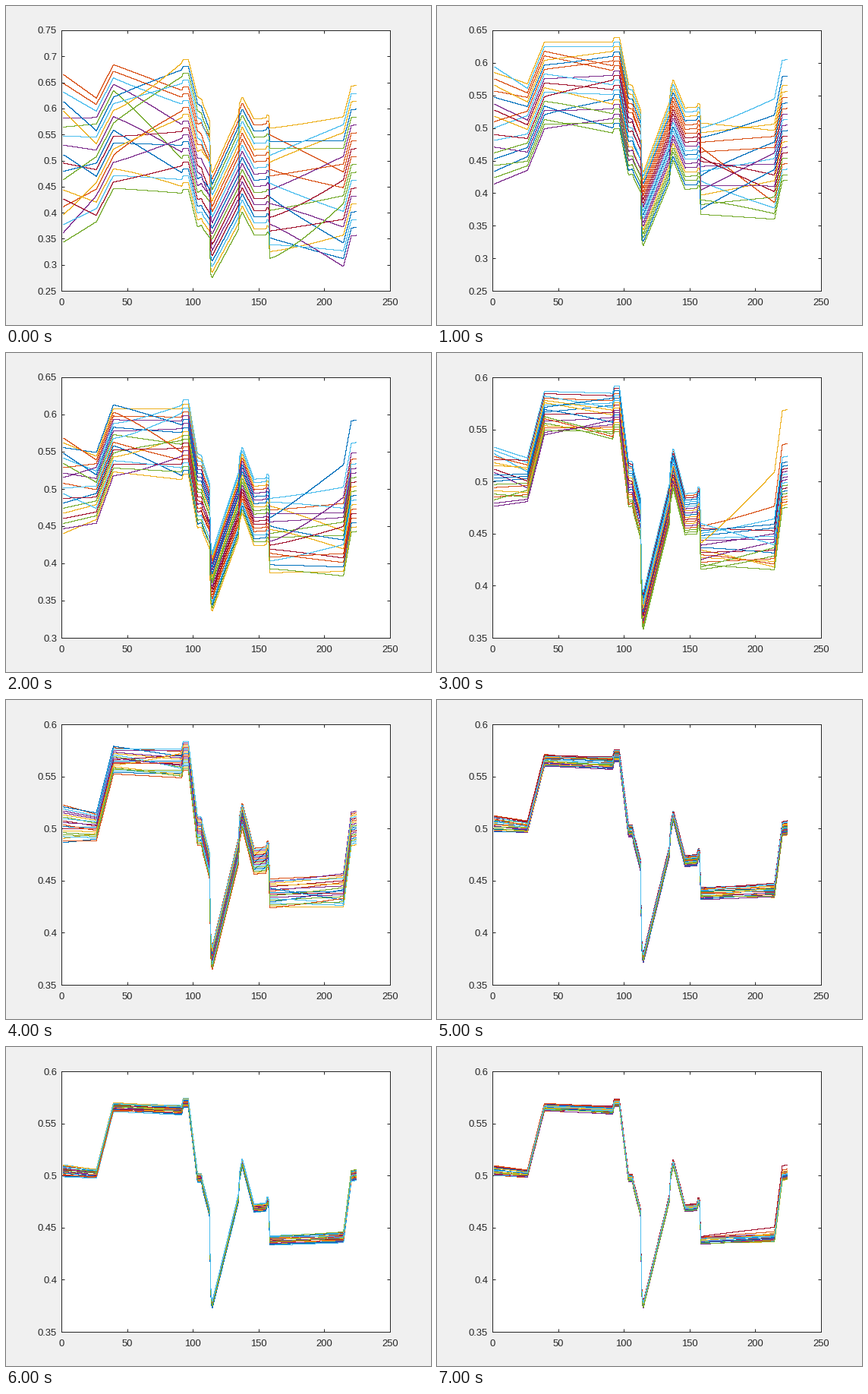
Animation, 560 px wide and 420 px high, one loop 8 s. Source, as a matplotlib script:

```python
import numpy as np
import matplotlib.pyplot as plt
from matplotlib.animation import FuncAnimation

plt.rcParams["font.family"] = "Liberation Sans"
W, H, DPI = 560, 420, 100
PX = 72 / DPI
INK = "#262626"
COLORS = ["#0072BD", "#D95319", "#EDB120", "#7E2F8E",
          "#77AC30", "#4DBEEE", "#A2142F"]
COUNT = 20
LEFT, BOTTOM, AX_W, AX_H = 73, 45, 433, 343
X_MAX = 250

# Curve that all others settle on
KNOTS = np.array([
    (0, .505), (26, .502), (39, .566), (91, .563), (92, .570), (96, .570),
    (103, .498), (106, .498), (107, .490), (112, .466), (113, .390),
    (114, .375), (134, .478), (135, .500), (137, .513), (146, .469),
    (155, .470), (156, .476), (157, .475), (158, .438), (214, .441),
    (220, .500), (224, .501)])
X = np.arange(2, 389) * X_MAX / AX_W    # one sample per pixel column
BASE = np.interp(X, *KNOTS.T)

# Relative spread at x = 0, 39, 91, 158, 214 and how far curves swap rank there
SPREAD = [1.3, 0.95, 1, 1, 1.15]
SWAP = [0.5, 0.12, 0.25, 0.08, 0.25]

# Per step: axis limits, spread, stretch of the topmost curve's right end
STEPS = [(0.25, 0.75, 0.125, 0), (0.25, 0.65, 0.070, 0.3),
         (0.30, 0.65, 0.050, 0.6), (0.35, 0.60, 0.022, 1.7),
         (0.35, 0.60, 0.014, 0), (0.35, 0.60, 0.006, 0),
         (0.35, 0.60, 0.0045, 0), (0.35, 0.60, 0.0038, 1.2)]


def curve(offsets, bend):
    """Base curve moved by offsets that glide between the key places."""
    p, q, r, t, s = offsets
    shift = np.interp(
        X, [0, 26, 39, 91, 103, 112, 114, 134, 157, 158, 214],
        [p, q, q, r, r, .5 * r + .4 * t, .8 * t, .88 * t, .9 * t, t, s])
    for x0, x1, a, b in ((39, 91, q, r), (158, 214, t, s)):
        part = (X >= x0) & (X <= x1)
        shift[part] = a + (b - a) * ((X[part] - x0) / (x1 - x0)) ** bend
    return BASE + shift


def generation(seed, spread, stretch):
    """Evenly ranked curves whose order is partly shuffled at each key place."""
    rng = np.random.default_rng(seed)
    rank = rng.permutation(COUNT) / (COUNT - 1)
    offsets = np.empty((COUNT, 5))
    for k in range(5):
        noisy = rank + SWAP[k] * rng.normal(size=COUNT)
        rank = np.argsort(np.argsort(noisy)) / (COUNT - 1)
        offsets[:, k] = spread * SPREAD[k] * (2 * rank - 1)
    offsets[:, 4] *= 1 + stretch * rank ** 20
    return [curve(o, rng.uniform(0.8, 1.3)) for o in offsets]


generations = [generation(seed, spread, stretch)
               for seed, (_, _, spread, stretch) in enumerate(STEPS)]

fig = plt.figure(figsize=(W / DPI, H / DPI), dpi=DPI, facecolor="#F0F0F0")
ax = fig.add_axes([LEFT / W, BOTTOM / H, AX_W / W, AX_H / H])
ax.set_xlim(0, X_MAX)
ax.set_xticks(range(0, X_MAX + 1, 50))
ax.tick_params(direction="in", top=True, right=True, length=4.3 * PX,
               width=PX, color=INK, labelcolor=INK, labelsize=13 * PX)
ax.tick_params(axis="x", pad=9.5 * PX)
ax.tick_params(axis="y", pad=6 * PX)
for spine in ax.spines.values():
    spine.set(color=INK, linewidth=PX)

# Snapped steps give crisp lines one pixel wide
lines = [ax.plot([], [], color=COLORS[i % 7], lw=PX, antialiased=False,
                 drawstyle="steps-post", snap=True)[0] for i in range(COUNT)]


def draw(i):
    low, high = STEPS[i][:2]
    ticks = np.linspace(low, high, round((high - low) / 0.05) + 1)
    ax.set_ylim(low, high)
    ax.set_yticks(ticks, [f"{v:.2g}" for v in ticks])
    for line, y in zip(lines, generations[i]):
        line.set_data(X, y)
    return lines


anim = FuncAnimation(fig, draw, frames=len(STEPS), interval=1000,
                     repeat=True, repeat_delay=0, blit=False)
plt.show()
```
